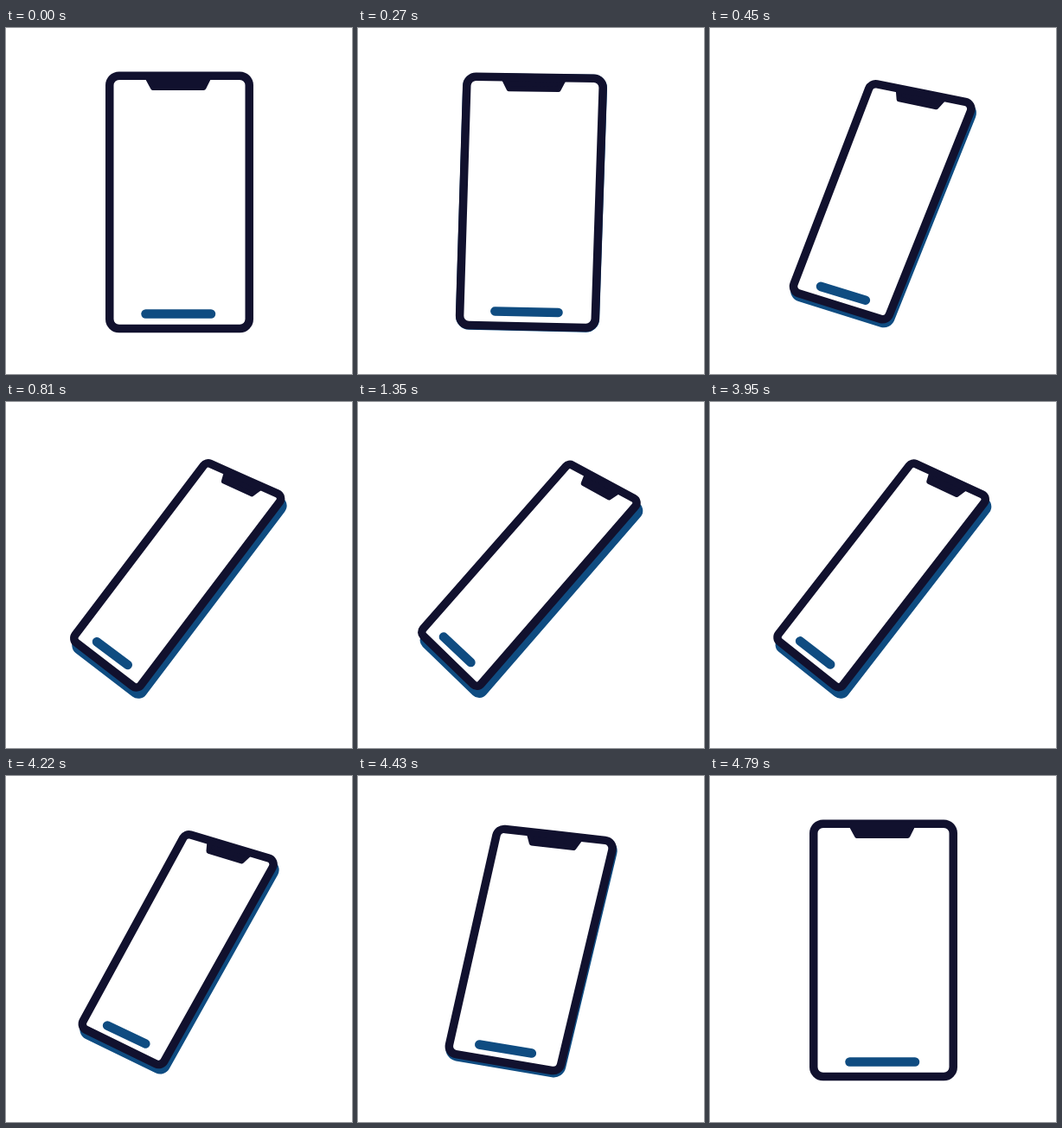
Recreate the animation shown at these times as an HTML page with a canvas. Size 400 px wide and 400 px high, loop 5.82 s.

```html
<!DOCTYPE html>
<html lang="en">
<head>
<meta charset="utf-8">
<title>Tilting phone</title>
<style>
  html, body { margin: 0; width: 100%; height: 100%; overflow: hidden; background: #fff; }
  canvas { display: block; }
</style>
</head>
<body>
<canvas id="stage" width="400" height="400"></canvas>
<script>
  const LOOP = 5820, STEP = 30, MOVE = 1350, BACK = 3440;
  const NAVY = '#11112e', BLUE = '#0f4c81';
  const LINE = 9.5, PILL = 10.5;
  const ctx = document.getElementById('stage').getContext('2d');
  ctx.lineJoin = ctx.lineCap = 'round';

  // Corners of the case outline, clockwise from top left
  const left = 119.75, top_ = 55.25, right = 281.25, bottom = 347.5;
  const upright = [[left, top_], [right, top_], [right, bottom], [left, bottom]];
  const tilted = [[243.6, 70.8], [325.5, 115], [138, 331], [71.5, 266.5]];

  // Details in upright coordinates; they follow the corners
  const notch = [[163.5, 57], [170, 69], [228.5, 69], [234.5, 57]];
  const pill = [[161.5, 330.5], [237, 330.5]];

  const mix = (a, b, k) => a + (b - a) * k;
  const mixPoint = (p, q, k) => [mix(p[0], q[0], k), mix(p[1], q[1], k)];

  function bezier(x1, y1, x2, y2) {
    const at = (a, b, s) => 3 * a * s * (1 - s) ** 2 + 3 * b * s * s * (1 - s) + s ** 3;
    return x => {
      let lo = 0, hi = 1;
      for (let i = 0; i < 24; i++) {
        const mid = (lo + hi) / 2;
        if (at(x1, x2, mid) < x) lo = mid; else hi = mid;
      }
      return at(y1, y2, (lo + hi) / 2);
    };
  }
  // Swings back first, then whips over and settles
  const ease = bezier(0.31, -0.78, 0, 1.09);

  function tiltAt(t) {
    const since = t < BACK ? t : t - BACK;
    const part = Math.min(1, Math.floor(since / STEP) * STEP / MOVE);
    const x = t < BACK ? part : 1 - part;
    return x === 0 || x === 1 ? x : ease(x);
  }

  function rounded(quad, r) {
    const start = mixPoint(quad[0], quad[1], 0.5);
    ctx.beginPath();
    ctx.moveTo(...start);
    for (let i = 1; i <= 4; i++) {
      const end = i === 4 ? start : quad[(i + 1) % 4];
      ctx.arcTo(...quad[i % 4], ...end, r);
    }
    ctx.closePath();
  }

  function paint(fill, stroke, width) {
    ctx.fillStyle = fill;
    ctx.strokeStyle = stroke;
    ctx.lineWidth = width;
    ctx.fill();
    ctx.stroke();
  }

  function trace(points) {
    ctx.beginPath();
    for (const p of points) ctx.lineTo(...p);
  }

  function draw(t) {
    const k = tiltAt(t);
    const quad = upright.map((p, i) => mixPoint(p, tilted[i], k));
    const radius = mix(11, 6, k);
    const place = ([x, y]) => {
      const u = (x - left) / (right - left), v = (y - top_) / (bottom - top_);
      return mixPoint(mixPoint(quad[0], quad[1], u), mixPoint(quad[3], quad[2], u), v);
    };

    ctx.clearRect(0, 0, 400, 400);
    if (k !== 0) {
      rounded(quad.map(([x, y]) => [x + 2.5 * k, y + 9 * k]), radius);
      paint(BLUE, BLUE, LINE);
    }
    rounded(quad, radius);
    paint('#fff', NAVY, LINE);
    trace(notch.map(place));
    ctx.closePath();
    paint(NAVY, NAVY, 6);
    trace(pill.map(place));
    paint(BLUE, BLUE, PILL);
  }

  const begin = performance.now();
  function tick() {
    draw((performance.now() - begin) % LOOP);
    requestAnimationFrame(tick);
  }
  tick();
</script>
</body>
</html>
```
